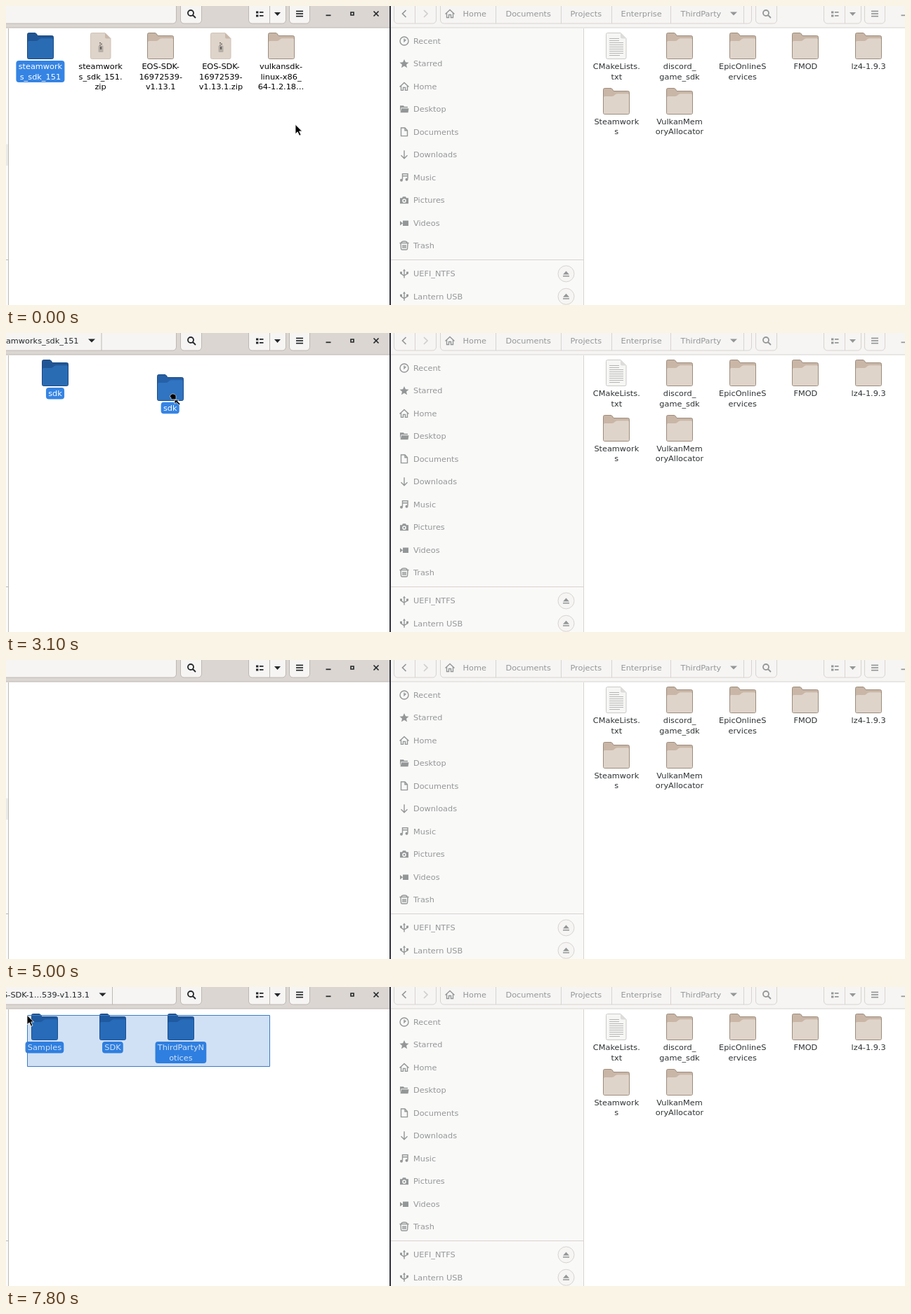
An HTML page with a canvas for the animation above (8000 ms loop, 1280 px wide and 427 px high).

```html
<!DOCTYPE html>
<html lang="en">
<head>
<meta charset="utf-8">
<title>File manager</title>
<style>
html, body { margin: 0; width: 100%; height: 100%; overflow: hidden; background: #fff; }
canvas { display: block; }
</style>
</head>
<body>
<canvas id="stage" width="1280" height="427"></canvas>
<script>
const c = document.getElementById('stage').getContext('2d');
const LOOP = 8000, LINE = 14.5, BLUE = '#3584e4', FONT = '11.3px "DejaVu Sans", sans-serif';

// Sidebar glyphs around 0,0: [stroked path, filled path]
const glyphs = {
  Recent: ['M-6 0a6 6 0 1 0 12 0a6 6 0 1 0-12 0M0-3.5V.5L2.5-2', ''],
  Starred: ['', 'M0-6.5L1.9-2.2 6.5-1.8 3 1.2 4.1 5.8 0 3.3-4.1 5.8-3 1.2-6.5-1.8-1.9-2.2Z'],
  Home: ['M-6.5 .5L0-5.5 6.5 .5M-4.5-1V5.5H-1.5V1.5H1.5V5.5H4.5V-1', ''],
  Desktop: ['', 'M-6-5H-1L0-3.5H5V-2H-4.5L-6 4ZM-4-1H6.5L5.5 5H-5.5Z'],
  Documents: ['M-4.5-5.8H1L4.5-2V5.8H-4.5ZM1-5.5V-2H4.5', ''],
  Downloads: ['M0-6V5M-4.5 1L0 5.5 4.5 1', ''],
  Music: ['M-2.5 3V-5H5V2M-2.5-2H5', 'M-6 4a2 2 0 1 0 4 0a2 2 0 1 0-4 0M1.5 3a2 2 0 1 0 4 0a2 2 0 1 0-4 0'],
  Pictures: ['', 'M-6-3H-3L-2-5H2L3-3H6V5H-6ZM-2.8 1a2.8 2.8 0 1 0 5.6 0a2.8 2.8 0 1 0-5.6 0ZM-1.3 1a1.3 1.3 0 1 0 2.6 0a1.3 1.3 0 1 0-2.6 0Z'],
  Videos: ['', 'M-2-3H6V4.5H-2ZM-6-2.5L-2 .7-6 4Z'],
  Trash: ['M-6.5-3.5H6.5M-4-4Q-4-6 0-6Q4-6 4-4M-5-3L-4.5 4.5Q-4.3 6-3 6H3Q4.3 6 4.5 4.5L5-3M-2-1V4M0-1V4M2-1V4', ''],
  USB: ['M0 6V-5M-4.5-2V0L0 3M4.5-2V0L0 2.5', 'M-2-4L0-7 2-4ZM-6-3H-3V0H-6ZM3-3H6V0H3Z']
};
const places = ['Recent', 'Starred', 'Home', 'Desktop', 'Documents', 'Downloads',
  'Music', 'Pictures', 'Videos', 'Trash'];

const row = (x, pitch, top, names) => names.map((name, i) => {
  const lines = name.split('|');
  const kind = /zip$/.test(name) ? 'zip' : /txt$/.test(name) ? 'txt' : 'folder';
  return { x: x + pitch * i, top, lines, kind };
});
const views = {
  downloads: row(48.9, 85.65, 38, ['steamwork|s_sdk_151', 'steamwork|s_sdk_151.|zip',
    'EOS-SDK-|16972539-|v1.13.1', 'EOS-SDK-|16972539-|v1.13.1.zip', 'vulkansdk-|linux-x86_|64-1.2.18…']),
  sdk: row(70, 0, 38, ['sdk']),
  eos: row(54.9, 97, 38, ['Samples', 'SDK', 'ThirdPartyN|otices'])
};
const thirdParty = [
  ...row(869.3, 89.7, 38, ['CMakeLists.|txt', 'discord_|game_sdk', 'EpicOnlineS|ervices', 'FMOD', 'lz4-1.9.3']),
  ...row(869.3, 89.7, 116.7, ['Steamwork|s', 'VulkanMem|oryAllocator'])
];

// Pointer path: time, x, y
const path = [
  [100, 412, 169], [800, 128, 82], [900, 128, 82], [1100, 58, 68], [1500, 58, 68],
  [2100, 86, 79], [2200, 86, 79], [2400, 73, 69], [2700, 73, 69], [3000, 150, 80],
  [3500, 585, 134], [3600, 872, 136], [3900, 872, 136], [4500, -20, 213], [5100, -20, 213],
  [5400, 90, 95], [5500, 90, 95], [6000, 208, 70], [6400, 208, 70], [6900, 224, 77],
  [7100, 376, 114], [7200, 366, 100], [7600, 4, 44], [7700, 12, 41], [7800, 30, 40]
];

const clamp = v => Math.max(0, Math.min(1, v));
const mix = (a, b, f) => `rgb(${a.map((v, i) => Math.round(v + (b[i] - v) * f))})`;

function pointer(t) {
  const i = path.findIndex(p => p[0] > t);
  if (i === 0) return path[0].slice(1);
  if (i < 0) return path[path.length - 1].slice(1);
  const [a, b] = [path[i - 1], path[i]], f = (t - a[0]) / (b[0] - a[0]);
  return [a[1] + (b[1] - a[1]) * f, a[2] + (b[2] - a[2]) * f];
}

function palette(focus) {
  return {
    ink: mix([148, 151, 151], [36, 40, 42], focus),
    label: mix([46, 50, 52], [0, 0, 0], focus),
    head: mix([246, 245, 244], [219, 214, 210], focus),
    line: mix([216, 211, 207], [190, 184, 178], focus),
    side: mix([249, 249, 248], [251, 251, 250], focus)
  };
}

function rect(x, y, w, h, color) {
  c.fillStyle = color;
  c.fillRect(x, y, w, h);
}
function round(x, y, w, h, r, fill, stroke) {
  c.beginPath();
  c.roundRect(x, y, w, h, r);
  if (fill) { c.fillStyle = fill; c.fill(); }
  if (stroke) { c.strokeStyle = stroke; c.lineWidth = 1; c.stroke(); }
}
function shape(d, x, y, fill, stroke, width = 1) {
  const p = new Path2D(d);
  c.save();
  c.translate(x, y);
  if (fill) { c.fillStyle = fill; c.fill(p, 'evenodd'); }
  if (stroke) { c.strokeStyle = stroke; c.lineWidth = width; c.stroke(p); }
  c.restore();
}
function text(s, x, y, color, align = 'left') {
  c.font = FONT;
  c.textAlign = align;
  c.fillStyle = color;
  c.fillText(s, x, y);
}
function glyph(name, x, y, color) {
  const [line, solid] = glyphs[name];
  if (line) shape(line, x, y, null, color, 1.4);
  if (solid) shape(solid, x, y, color);
}

function folder(x, y, sel, hover) {
  const [back, front, edge] = sel
    ? (hover ? ['#2660a6', '#3074c2', '#1c4c86'] : ['#205595', '#2a6cb4', '#1b4a82'])
    : (hover ? ['#d8c7b8', '#ebe2d9', '#ac9a8b'] : ['#c9b6a6', '#dfd4ca', '#9d8c7e']);
  shape('M-18.5 2.5Q-18.5 .5-16.5 .5H-8Q-6.5 .5-5.5 2L-4 4.5H16.5Q18.5 4.5 18.5 6.5V35.5Q18.5 37.5 16.5 37.5H-16.5Q-18.5 37.5-18.5 35.5Z', x, y, back, edge);
  shape('M-18 13.5Q-18 12-16.5 12H-6Q-4.5 12-3.5 11L-1 9Q0 8.2 1.5 8.2H16.5Q18 8.2 18 9.7V35.5Q18 37 16.5 37H-16.5Q-18 37-18 35.5Z', x, y, front);
}
function page(x, y, zip, hover) {
  shape('M-14.5 2.5Q-14.5 .5-12.5 .5H6L14 8.5V35.5Q14 37.5 12 37.5H-12.5Q-14.5 37.5-14.5 35.5Z', x, y,
    zip ? (hover ? '#ebe2d9' : '#dfd4ca') : '#f6f6f4', zip ? '#d0c3b7' : '#cbcac7');
  shape('M6 .5V6.5Q6 8.5 8 8.5H14Z', x, y, zip ? '#c9b8a9' : '#dddcda');
  if (zip) {
    for (let i = 0; i < 3; i++) rect(x - 2 + (i % 2) * 2, y + 14 + i * 1.6, 2, 1.6, '#77716b');
    round(x - 3.5, y + 18.5, 7, 9.5, 1, '#b5afa8');
    rect(x - 1.2, y + 20, 2.4, 4, '#67625d');
  } else {
    for (let i = 0; i < 9; i++) rect(x - 10, y + 8 + i * 3, i < 2 ? 14 : i === 8 ? 15 : 20, 1, '#b5b5b3');
  }
}

function labelBox(it) {
  c.font = FONT;
  const w = Math.max(...it.lines.map(s => c.measureText(s).width)) + 6.5;
  return { x: it.x - w / 2, y: it.top + 40, w, h: it.lines.length * LINE + 2 };
}
function isOver(it, [px, py]) {
  const b = labelBox(it), dy = py - it.top;
  return (Math.abs(px - it.x) < 19 && dy >= 0 && dy < 38) ||
    (px > b.x && px < b.x + b.w && dy >= 38.5 && py < b.y + b.h);
}
function icon(it, sel, hover) {
  const x = Math.round(it.x), y = Math.round(it.top);
  if (it.kind === 'folder') folder(x, y, sel, hover);
  else page(x, y, it.kind === 'zip', hover);
}
function label(it, sel, color) {
  if (sel) {
    const b = labelBox(it);
    round(b.x, b.y, b.w, b.h, 4, BLUE);
  }
  it.lines.forEach((s, i) => text(s, it.x, it.top + 52 + i * LINE, sel ? '#fff' : color, 'center'));
}
function item(it, sel, hover, color) {
  icon(it, sel, hover);
  label(it, sel, color);
}

function header(x, w, p) {
  rect(x, 0, w, 31, p.head);
  rect(x, 30.5, w, 1, p.line);
}
function button(x, w, p, r = 5) {
  round(x + .5, -8.5, w - 1, 33.5, r, '#f6f5f4', p.line);
}
function burger(x, p) {
  for (let i = -1; i < 2; i++) rect(x - 5, 10.2 + i * 3.6, 10, 1.7, p.ink);
}
// Search, view, menu and window buttons
function tools(dx, p) {
  c.save();
  c.translate(dx, 0);
  button(248, 31, p);
  shape('M-5-1a4 4 0 1 0 8 0a4 4 0 1 0-8 0M2 2L6 6', 264, 11, null, p.ink, 1.8);
  button(345, 31, p, [0, 0, 0, 5]);
  button(375, 24, p, [0, 0, 5, 0]);
  for (let i = 0; i < 2; i++) {
    rect(356, 7.5 + i * 5, 3.4, 3, p.ink);
    rect(361, 8 + i * 5, 5.5, 1.8, p.ink);
  }
  shape('M-4.5-2H4.5L0 3Z', 386.5, 11, p.ink);
  button(403, 30, p);
  burger(418, p);
  rect(455.5, 12.5, 7, 1.7, p.ink);
  shape('M-2-2H2V2H-2Z', 493, 11, null, p.ink, 1.6);
  shape('M-3.5-3.5L3.5 3.5M3.5-3.5L-3.5 3.5', 527, 11, null, p.ink, 1.7);
  c.restore();
}

function leftWindow(t, focus, mouse) {
  const p = palette(focus);
  // Start, folder, loading time
  const [start, name, delay] = [[0, 'downloads', 0], [1600, 'sdk', 200], [5000, 'downloads', 100], [6400, 'eos', 200]]
    .filter(v => v[0] <= t).pop();
  rect(0, 0, 547, 427, '#fff');
  header(0, 547, p);
  round(-10, -8.5, 252.5, 33.5, 5, '#f6f5f4', p.line);
  if (name !== 'downloads') {
    const [title, end] = name === 'sdk' ? ['steamworks_sdk_151', 103.5] : ['EOS-SDK-1…539-v1.13.1', 119];
    text(title, end, 15, p.ink, 'right');
    shape('M-5-2.5H5L0 2.5Z', end + 18.5, 11, p.ink);
    rect(end + 32, 0, 1, 25, p.line);
  }
  tools(0, p);
  rect(0, 32, 3, 395, p.side);
  if (name === 'downloads') rect(0, 197.5, 3, 30.5, '#ebebe9');
  rect(0, 362, 3, 1, p.line);
  rect(3, 32, 1, 395, p.line);

  const band = t >= 7200 && { x: mouse[0], y: mouse[1], w: 376 - mouse[0], h: 114 - mouse[1] };
  if (t >= start + delay) views[name].forEach((it, i) => {
    const b = labelBox(it);
    const sel = name === 'downloads' ? i === (t >= 6100 ? 2 : 0)
      : name === 'sdk' ? t >= 2700
      : band && b.x + b.w > band.x && b.y + b.h > band.y;
    item(it, sel, !band && isOver(it, mouse), p.label);
  });
  if (band) round(band.x + .5, band.y + .5, band.w - 1, band.h - 1, 0, 'rgba(27,106,203,.2)', '#3b7cc6');
}

function rightWindow(t, focus) {
  const p = palette(focus);
  rect(546, 0, 734, 427, '#fff');
  header(548, 732, p);
  button(552, 31, p, [0, 0, 0, 5]);
  button(582, 31, p, [0, 0, 5, 0]);
  shape('M2.5-5L-2.5 0 2.5 5', 567, 11, null, p.ink, 1.7);
  shape('M-2.5-5L2.5 0-2.5 5', 597.5, 11, null, '#cfcecc', 1.7);
  button(618, 444, p);
  for (const x of [697, 790, 862, 946, 1050]) rect(x, 0, 1, 25, p.line);
  glyph('Home', 632, 11, p.ink);
  [['Home', 650.5], ['Documents', 711.5], ['Projects', 803.5], ['Enterprise', 875.5], ['ThirdParty', 960.5]]
    .forEach(([s, x]) => text(s, x, 15, p.ink));
  shape('M-5-2.5H5L0 2.5Z', 1036, 11, p.ink);
  tools(819, p);

  rect(548, 32, 274, 395, p.side);
  rect(822, 32, 1, 395, p.line);
  places.forEach((s, i) => {
    const y = 50 + i * 32.45;
    glyph(s, 567, y, p.ink);
    text(s, 580, y + 4, p.ink);
  });
  rect(548, 362, 274, 1, p.line);
  ['UEFI_NTFS', 'Lantern USB'].forEach((s, i) => {
    const y = 382.4 + i * 32.4;
    glyph('USB', 567, y, p.ink);
    text(s, 580, y + 4, p.ink);
    round(786, y - 11.5, 23, 23, 11.5, '#f6f5f4', p.line);
    shape('M-4.5 1L0-4 4.5 1ZM-4.5 2.5H4.5V4H-4.5Z', 797.5, y, p.ink);
  });

  thirdParty.forEach(it => {
    const target = it.lines[0] === 'Steamwork' && t >= 3500 && t < 3900;
    icon(it, false, target);
    label(it, target, p.label);
  });
  rect(546, 0, 2, 427, '#2d2f3a');
}

function drawPointer(t, [x, y]) {
  if (t >= 2800 && t < 3900) {
    item({ x: x - 3.3, top: y - 32, lines: ['sdk'], kind: 'folder' }, true, true);
    shape('M-4 0Q-3-3 0-4Q4-4 5-1V4H-2V1.5Z', x, y, '#000', '#fff', .6);
    shape('M3 5H9L7.3 6.7 11 10.5 9.5 12 5.5 8.3 3 10.5Z', x, y, '#000', '#fff', .7);
  } else {
    shape('M0 .3V13.7L3.2 10.8 5.7 16.2 8 15.1 5.6 9.9H9.6Z', x, y, '#000', '#fff', .8);
  }
}

function draw(now) {
  const t = Math.floor((now % LOOP) / 100) * 100;
  const mouse = pointer(t);
  const focus = clamp((t - 3800) / 200) - clamp((t - 4400) / 200);
  leftWindow(t, 1 - focus, mouse);
  rightWindow(t, focus);
  drawPointer(t, mouse);
  requestAnimationFrame(draw);
}
requestAnimationFrame(draw);
</script>
</body>
</html>
```
